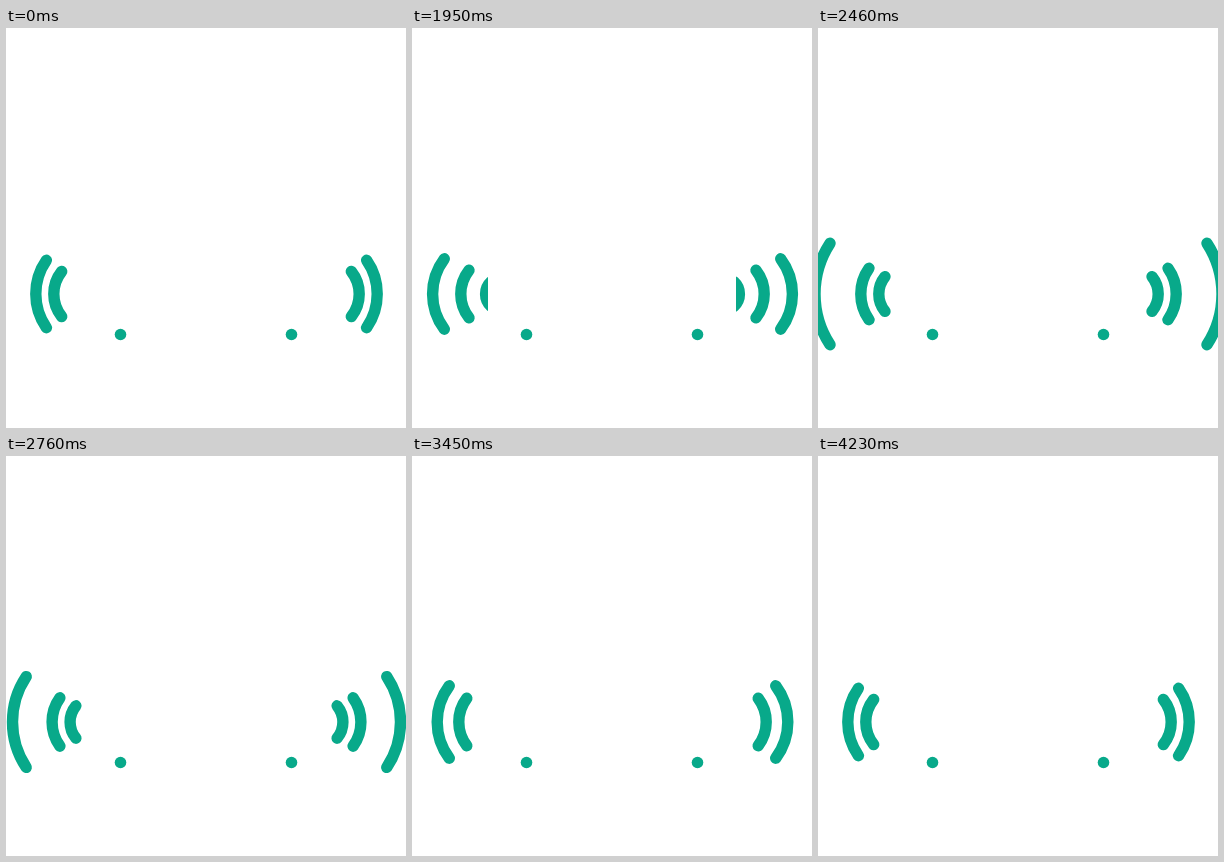
Write an HTML page that moves like this. It is 400 px wide and 400 px high and loops after 4260 ms.

```html
<!DOCTYPE html>
<html lang="en">
<head>
<meta charset="utf-8">
<title>Sound waves</title>
<style>
  html, body { margin: 0; width: 100%; height: 100%; overflow: hidden; background: #fff; }
  svg { display: block; width: 100%; height: 100%; }
  .wave { fill: none; stroke: #08a98a; stroke-width: 11.4; stroke-linecap: round; }
  .dot { fill: #08a98a; }
</style>
</head>
<body>
<svg viewBox="0 0 400 400">
  <defs>
    <clipPath id="outside"><path d="M0 0H76V400H0ZM324 0H400V400H324Z"/></clipPath>
  </defs>
  <g clip-path="url(#outside)">
    <g id="waves">
      <path class="wave"/>
      <path class="wave"/>
      <path class="wave"/>
    </g>
    <use href="#waves" transform="translate(401) scale(-1 1)"/>
  </g>
  <circle class="dot" cx="114.5" cy="306.5" r="5.8"/>
  <circle class="dot" cx="285.5" cy="306.5" r="5.8"/>
</svg>
<script>
const LOOP = 4260, STEP = 30, CENTER_Y = 266;

// Each pose lists the outer, middle and inner arc as [tip x, crest x, half height].
const rest = [[40.4, 29.8, 33.7], [55.7, 47.8, 22.6], [92, 86, 12]];
const burst = [[10, -5, 52.5], [51, 43, 25.5], [67, 61, 17.3]];
const falling = [[32.3, 20.6, 35.2], [57, 48.8, 23.8], [79, 73.6, 12.3]];
const tucked = [[45, 35, 30], [60, 53, 21], [82, 77, 12]];
const wide = [[12, -3, 50.7], [51, 42.8, 25.7], [67, 60.8, 17.4]];
const near = [[49, 39.8, 26.8], [64, 57.6, 18.9], [80, 75.6, 12]];
const overshoot = [[37.3, 25.2, 36.2], [54.8, 46.8, 23.8], [92, 86, 12]];

const keys = [
  [0, rest], [1530, rest], [1740, burst], [1950, falling], [2100, tucked],
  [2460, wide], [2610, wide], [3090, near], [3450, overshoot], [3690, rest], [LOOP, rest]
];

const arcs = document.querySelectorAll(".wave");
const mix = (a, b, p) => a + (b - a) * p;
const ease = p => (1 - Math.cos(Math.PI * p)) / 2;

function arcPath([tip, crest, half]) {
  const sag = tip - crest;
  const radius = (sag * sag + half * half) / (2 * sag);
  return `M${tip} ${CENTER_Y - half}A${radius} ${radius} 0 0 0 ${tip} ${CENTER_Y + half}`;
}

function draw(now) {
  const time = Math.floor((now % LOOP) / STEP) * STEP;
  const next = keys.findIndex(([at]) => at > time);
  const [start, from] = keys[next - 1];
  const [end, to] = keys[next];
  const p = ease((time - start) / (end - start));
  arcs.forEach((arc, i) => {
    arc.setAttribute("d", arcPath(from[i].map((v, j) => mix(v, to[i][j], p))));
  });
}

function tick() {
  draw(performance.now());
  requestAnimationFrame(tick);
}
tick();
</script>
</body>
</html>
```
